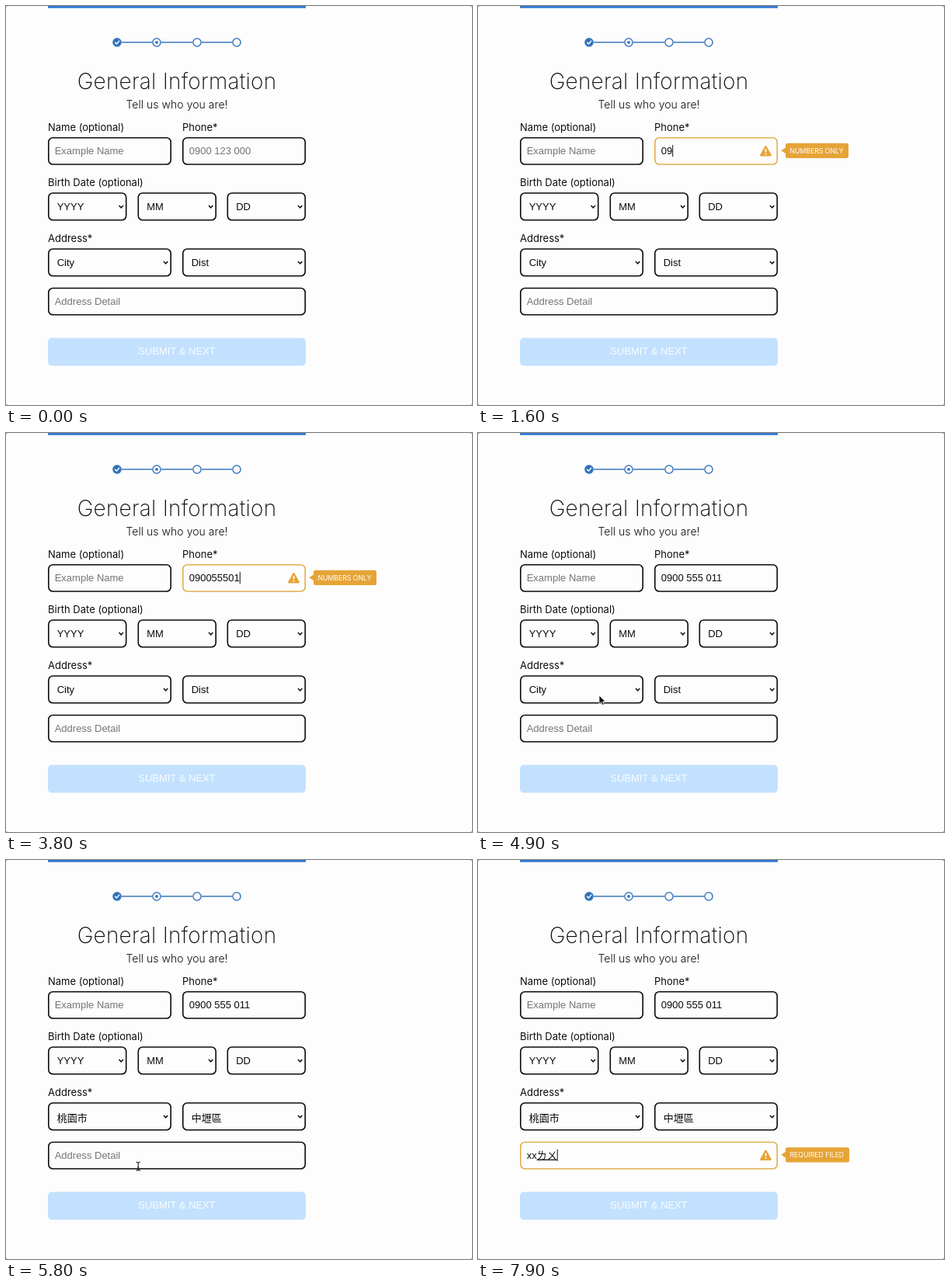
Write an HTML page that moves like this. It is 600 by 514 pixels and loops after 8000 ms.

```html
<!DOCTYPE html>
<html lang="en">
<head>
<meta charset="utf-8">
<title>General Information</title>
<style>
  html, body { margin: 0; height: 100%; overflow: hidden; background: #8a8a8a; }
  svg { display: block; width: 100vw; height: 100vh; }
  text { font: 13px "Liberation Sans", Arial, "Noto Sans CJK TC", "Noto Sans CJK", sans-serif; fill: #0c0c0c; white-space: pre; }
  .ui { font-family: Inter, sans-serif; }
  .mid { text-anchor: middle; }
  .hint { fill: #757575; }
  .box { fill: #fdfdfd; stroke: #0c0c0c; stroke-width: 1.6; }
  .bad { stroke: #e0b04f; }
  .line { fill: none; stroke: #3c79bd; stroke-width: 1.5; }
  .cjk { font-family: "Noto Sans CJK TC", "Noto Sans CJK", "Noto Sans CJK JP", sans-serif; }
</style>
</head>
<body>
<svg viewBox="0 0 600 514">
  <defs>
    <linearGradient id="glass" x2="0" y2="1">
      <stop offset="0" stop-color="#efefef"/>
      <stop offset=".4" stop-color="#ececee"/>
      <stop offset=".55" stop-color="#e3ebf3"/>
      <stop offset=".72" stop-color="#e1e8ef"/>
      <stop offset="1" stop-color="#c6c8ca"/>
    </linearGradient>
    <filter id="shade" x="-20%" y="-20%" width="140%" height="140%">
      <feDropShadow dx="0" dy="2" stdDeviation="2.5" flood-opacity=".35"/>
    </filter>
  </defs>
  <rect width="600" height="514" rx="2.5" fill="#fdfdfd"/>
  <rect x="54" width="332" height="2.7" fill="#2f76d2"/>
  <path class="line" d="M149 46.8H188M200 46.8H240M252 46.8H291"/>
  <g id="steps"></g>
  <text class="ui mid" x="220" y="106.8" style="font-size:28px;font-weight:200;letter-spacing:.23px">General Information</text>
  <text class="ui mid" x="220" y="131.5" style="font-size:14px;font-weight:300;letter-spacing:.05px">Tell us who you are!</text>
  <g id="form"></g>
  <rect x="54" y="427.5" width="332" height="36" rx="5" fill="#c3e1fe"/>
  <text class="mid" x="220" y="449" style="fill:#f8fcff">SUBMIT &amp; NEXT</text>
  <g id="alerts"></g>
  <rect id="caret" width="1" height="15" fill="#111"/>
  <g id="menu"></g>
  <g id="arrow"><path d="M0 0V11.2L2.6 8.8L4.3 12.6L6.3 11.7L4.6 8H8.2Z" fill="#111" stroke="#fff" stroke-width=".8"/></g>
  <path id="beam" d="M-2.8-5.5Q0-5.5 0-3.5Q0-5.5 2.8-5.5M0-4V4M-2.8 5.5Q0 5.5 0 3.5Q0 5.5 2.8 5.5M-1.3 1.5H1.3" fill="none" stroke="#222" stroke-width="1.1"/>
</svg>
<script>
const $ = id => document.getElementById(id);
const LOOP = 8000, STEP = 100, ROW = 17.3;
const PHONE = "0900555011", ADDRESS = ["x", "x", "ㄌ", "ㄨ"];
const CITIES = "臺北市 基隆市 新北市 宜蘭縣 桃園市 新竹市 新竹縣 苗栗縣 臺中市 彰化縣 南投縣".split(" ");

function add(parent, tag, attrs, text = "") {
  const el = document.createElementNS("http://www.w3.org/2000/svg", tag);
  for (const key in attrs) el.setAttribute(key, attrs[key]);
  el.textContent = text;
  return parent.appendChild(el);
}
const show = (el, on) => { el.style.display = on ? "" : "none"; };

// Progress dots
[143, 194, 246, 297].forEach((cx, i) => {
  add($("steps"), "circle", { cx, cy: 46.8, r: 5.1, class: "line", style: i ? "" : "fill:#2f70b8" });
  if (i == 1) add($("steps"), "circle", { cx, cy: 46.8, r: 1.9, fill: "#2f70b8" });
});
add($("steps"), "path", { d: "M140.3 46.8L142.4 48.9L146 44.8", fill: "none", stroke: "#fff", "stroke-width": 1.5 });

// Form fields
const form = $("form");
const label = (x, y, text) => add(form, "text", { x, y, class: "ui" }, text);
const frame = (x, y, width, height) => add(form, "rect", { x: x + .8, y, width: width - 1.6, height, rx: 5.5, class: "box" });

function input(x, y, width, hint) {
  const box = frame(x, y, width, 34.2);
  const text = add(form, "text", { x: x + 8.7, y: y + 21.1, class: "hint" }, hint);
  return { box, text, hint, x: x + 8.7, y };
}
function select(x, y, width, value) {
  frame(x, y, width, 34.8);
  add(form, "path", { d: `M${x + width - 10} ${y + 16}l2.7 2.8l2.7 -2.8`, fill: "none", stroke: "#111", "stroke-width": 1.5 });
  return add(form, "text", { x: x + 11.7, y: y + 22 }, value);
}

label(54, 161.2, "Name (optional)");
label(227, 161.2, "Phone*");
label(54, 232.4, "Birth Date (optional)");
label(54, 304.4, "Address*");
input(54, 169.8, 159, "Example Name");
const phone = input(227, 169.8, 159, "0900 123 000");
select(54, 241, 101.5, "YYYY");
select(169.5, 241, 101.5, "MM");
select(284.5, 241, 101.5, "DD");
const city = select(54, 313, 159, "City");
const dist = select(227, 313, 159, "Dist");
const address = input(54, 363.5, 332, "Address Detail");

// Warning icon with tooltip
function alertAt(y, message, width) {
  const g = add($("alerts"), "g", { transform: `translate(0 ${y})`, fill: "#e6a437" });
  add(g, "path", { d: "M370.5-5.5L376.6 5.4H364.4Z", stroke: "#e6a437", "stroke-width": 2.4, "stroke-linejoin": "round" });
  add(g, "path", { d: "M370.5-2.8V1.4M370.5 3V4.8", stroke: "#fff", "stroke-width": 1.8 });
  add(g, "path", { d: "M390.3-.5L397-5V4Z" });
  add(g, "rect", { x: 396, y: -10, width, height: 19.2, rx: 2.5 });
  add(g, "text", { x: 401.5, y: 2.9, class: "ui", style: "font-size:8.7px;fill:#fff" }, message);
  return g;
}
phone.alert = alertAt(186.8, "NUMBERS ONLY", 81);
address.alert = alertAt(380.3, "REQUIRED FILED", 82);

// City menu
const menu = $("menu");
add(menu, "rect", { x: 47.2, y: 320.5, width: 158.8, height: 215, rx: 5, fill: "url(#glass)", filter: "url(#shade)" });
const mark = add(menu, "rect", { x: 47.2, width: 158.8, height: ROW, fill: "#5190f6" });
add(menu, "path", { d: "M51 332.5L53.2 335L56.8 329.4", fill: "none", stroke: "#333", "stroke-width": 1.2 });
const items = CITIES.map((name, i) =>
  add(menu, "text", { x: 62, y: 336.6 + i * ROW, class: "cjk" }, name));

// Pointer stops: time, x, y
const entry = [[200, 302, 219], [600, 290, 188], [1200, 290, 188]];
const travel = [[4200, 285, 190], [4500, 196, 334], [4900, 156, 338], [5000, 155, 338],
  [5200, 148.5, 400], [5600, 148.5, 401], [6000, 192, 388], [6300, 200.5, 385.5], [6900, 200.5, 385.5]];

function pointerAt(t) {
  const path = t < 3000 ? entry : travel;
  const i = path.findIndex((p, k) => k && t >= path[k - 1][0] && t <= p[0]);
  if (i < 0) return null;
  const [t0, x0, y0] = path[i - 1], [t1, x1, y1] = path[i];
  const u = (t - t0) / (t1 - t0), e = u * u * (3 - 2 * u);
  return [x0 + (x1 - x0) * e, y0 + (y1 - y0) * e];
}

const typed = (t, start, gap, max) => Math.max(0, Math.min(max, Math.floor((t - start) / gap) + 1));

function fill(field, value, bad) {
  field.text.textContent = value || field.hint;
  field.text.setAttribute("class", value ? "" : "hint");
  field.box.setAttribute("class", bad ? "box bad" : "box");
  show(field.alert, bad);
}

function drawCaret(t) {
  const onPhone = t >= 800 && t < 4800, onAddress = t >= 6600;
  const typing = (t >= 1300 && t < 4300) || t >= 7000;
  show($("caret"), (onPhone || onAddress) && (typing || t % 1000 < 500));
  const field = onAddress ? address : phone;
  const empty = field.text.getAttribute("class") == "hint";
  $("caret").setAttribute("x", field.x + (empty ? 0 : field.text.getComputedTextLength()));
  $("caret").setAttribute("y", field.y + 9.3);
}

function draw(t) {
  const n = typed(t, 1300, 300, 10), k = typed(t, 7000, 250, 4);
  const number = PHONE.slice(0, n);
  fill(phone, n == 10 ? number.replace(/(.{4})(.{3})/, "$1 $2 ") : number, n > 0 && n < 10);

  fill(address, ADDRESS.slice(0, Math.min(k, 2)).join(""), k > 0);
  if (k > 2) add(address.text, "tspan", { class: "cjk", "text-decoration": "underline" }, ADDRESS.slice(2, k).join(""));

  const chosen = t >= 5600;
  city.textContent = chosen ? "桃園市" : "City";
  dist.textContent = chosen ? "中壢區" : "Dist";
  for (const el of [city, dist]) {
    el.setAttribute("class", chosen ? "cjk" : "");
    el.setAttribute("y", chosen ? 336.5 : 335);
  }

  const at = pointerAt(t);
  const open = t >= 5000 && t < 5700;
  show(menu, open);
  menu.style.opacity = t >= 5600 ? .5 : 1;
  if (open) {
    const row = Math.floor((at[1] - 323.4) / ROW);
    mark.setAttribute("y", 323.8 + row * ROW);
    items.forEach((el, i) => { el.style.fill = i == row ? "#fff" : "#222"; });
  }

  const overText = at && !open && (at[1] < 205 && at[1] > 169 && at[0] > 227 || at[1] > 363 && at[1] < 398);
  show($("beam"), at && overText);
  show($("arrow"), at && !overText);
  if (at) for (const id of ["beam", "arrow"]) $(id).setAttribute("transform", `translate(${at})`);
  drawCaret(t);
}

const begin = performance.now();
function tick() {
  const t = (performance.now() - begin) % LOOP;
  draw(Math.floor(t / STEP) * STEP);
  requestAnimationFrame(tick);
}
tick();
</script>
</body>
</html>
```
